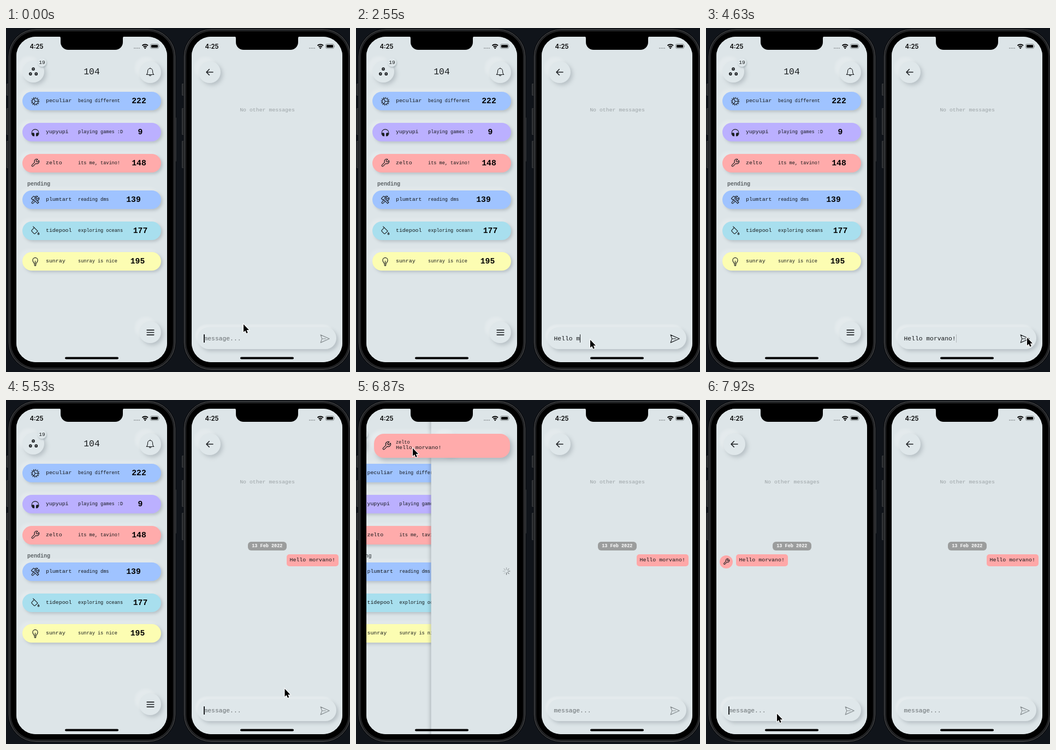
Recreate the animation shown at these times as an HTML page. Size 630x631 px, loop 8 s.

```html
<!DOCTYPE html>
<html lang="en">
<head>
<meta charset="utf-8">
<title>Chat on two phones</title>
<style>
  html, body { margin: 0; width: 100%; height: 100%; overflow: hidden; background: #10141a; }
  #stage { position: absolute; left: 0; top: 0; width: 630px; height: 631px; overflow: hidden; background: #10141a; }
  #stage div, #stage svg { position: absolute; box-sizing: border-box; }
  .phone { top: 0; width: 315px; height: 631px; }
  .body { left: 5px; top: 2px; width: 305px; height: 625px; border-radius: 50px; background: #000;
    border: 1px solid #55575a; box-shadow: inset 0 0 0 2px #1a1b1d, inset 0 0 0 3px #2c2d2f, 0 0 0 1px #08090b; }
  .key { background: #2b2d30; border: 1px solid #3a3c3f; border-radius: 1px; }
  .screen { left: 0; top: 0; width: 315px; height: 631px; background: #dde5e8;
    clip-path: inset(16px 20px 18px 19px round 35.5px); }
  .page { left: 19px; top: 0; width: 276px; height: 631px; background: #dde5e8; }
  .in { left: -19px; top: 0; width: 315px; height: 631px; }
  .t { font-family: "Liberation Mono", "Courier New", monospace; line-height: 20px; margin-top: -10px;
    white-space: pre; color: #15181a; }
  .mid { transform: translateX(-50%); }
  .soft { background: #dfe7ea; box-shadow: -8px -8px 5px rgba(255,255,255,.22), 4px 4px 7px rgba(125,138,145,.38); }
  .round { width: 40px; height: 40px; margin: -20px 0 0 -20px; border-radius: 50%; }
  .row { left: 30px; width: 254px; height: 34px; border-radius: 17px;
    box-shadow: 3px 3px 5px rgba(120,132,140,.35), -5px -5px 6px rgba(255,255,255,.22); }
  .input { left: 30px; top: 549px; width: 254px; height: 40px; border-radius: 20px;
    box-shadow: -4px -5px 3px rgba(255,255,255,.25), 4px 4px 6px rgba(125,138,145,.38); }
  .bubble { top: 283px; width: 95px; height: 22px; border-radius: 5px; background: #ffa8a8; }
  .pill { left: 122px; top: 259.5px; width: 70.5px; height: 16px; border-radius: 6px; background: #9b9d9d; }
  .caret { top: 562px; width: 1.3px; height: 15px; background: #1b1e20; }
  .banner { left: 33px; top: 0; width: 249px; height: 43.5px; border-radius: 18px; background: #ffabab;
    box-shadow: 4px 5px 8px rgba(110,122,130,.42), -6px -6px 6px rgba(255,255,255,.3); }
  .incoming { box-shadow: -2px 0 7px rgba(40,50,60,.32); }
</style>
</head>
<body>
<div id="stage"></div>
<script>
const LOOP = 8000;
const MESSAGE = 'Hello morvano!';
const SENDER = 'zelto';
const KEY_TIMES = [1350, 1500, 1650, 1950, 2100, 2250, 2550, 2700, 2850, 3140, 3290, 3440, 3590, 3890];
const SEND = 5230, DELIVERED = 5530, LOADED = 7320, NO_MORE = 7770, FOCUS = 7920;
const PITCH = 6.8;

const WRENCH = 'M14.7 6.3a1 1 0 0 0 0 1.4l1.6 1.6a1 1 0 0 0 1.4 0l3.8-3.8a6 6 0 0 1-8 8l-6.9 6.9a2.1 2.1 0 0 1-3-3l6.9-6.9a6 6 0 0 1 8-8z';
const path = (d, extra = '') => `<path d="${d}" ${extra}/>`;
const ICONS = {
  gear: '<circle cx="12" cy="12" r="7.800"/>' +
    '<circle cx="12" cy="12" r="9.800" stroke-width="2.400" stroke-linecap="butt" stroke-dasharray="2 3.130"/>' +
    path('M12 12H19.5M12 12L8.200 5.500M12 12L8.200 18.500'),
  headphones: path('M3 17v-4a9 9 0 0 1 18 0v4') +
    path('M3 14q5-3 7 1v7h-3q-4-1-4-8zM21 14q-5-3-7 1v7h3q4-1 4-8z', 'fill="currentColor" stroke="none"'),
  wrench: path(WRENCH),
  tools: path(WRENCH) + path('M2 8l6-6 5 3-2.5 2.5L21 18l-3 3L7.5 10.5l-2.5 1z', 'fill="#9fc3ff"'),
  bucket: path('M9.500 4.500l9 9-7 6.500q-1.500 1-2.500 0l-6-6q-1-1 0-2.500zM9.500 4.500l-3-3M20.500 17.500q3.500 4.500 0 5q-3.500-.5 0-5'),
  bulb: path('M9 17c0-3-3.500-4-3.500-8.500a6.500 6.500 0 0 1 13 0c0 4.500-3.500 5.500-3.500 8.500zM9.500 20h5M10.500 22.500h3M12 10.500V17'),
  bell: path('M18 9A6 6 0 0 0 6 9c0 7-3 9-3 9h18s-3-2-3-9M12 3V1.5M14 18.5a2 2.5 0 0 1-4 0'),
  menu: path('M4 6.500h16M4 12h16M4 17.500h16'),
  back: path('M20 12H4M11 5l-7 7 7 7'),
  dots: [[12, 5.5], [5, 17.5], [19, 17.5]].map(([x, y]) =>
    `<circle cx="${x}" cy="${y}" r="2.500" stroke-width="2.600"/>`).join(''),
  send: path('M1.5 2.5L23 12 1.5 21.5 5 12zM5 12h9')
};

const div = (cls, style = '', body = '', id = '') =>
  `<div class="${cls}" style="${style}"${id && ` id="${id}"`}>${body}</div>`;
const text = (x, y, size, str, style = '', cls = '', id = '') =>
  div('t ' + cls, `left:${x}px;top:${y}px;font-size:${size}px;${style}`, str, id);
const icon = (name, x, y, size, weight = 1.6, id = '') =>
  `<svg ${id && `id="${id}"`} viewBox="0 0 24 24" width="${size}" height="${size}" overflow="visible"
    style="left:${x - size / 2}px;top:${y - size / 2}px;color:#1b1e21" fill="none" stroke="currentColor"
    stroke-width="${weight}" stroke-linecap="round" stroke-linejoin="round">${ICONS[name]}</svg>`;
const button = (name, x, y, size, weight) =>
  div('soft round', `left:${x}px;top:${y}px`) + icon(name, x, y, size, weight);

const row = (y, color, glyph, name, status, count, cx) =>
  div('row', `top:${y}px;background:${color}`) + icon(glyph, 53, y + 17, 17) +
  text(73, y + 17, 9.9, name) + text(132, y + 17, 8.56, status) +
  text(cx, y + 17, 14.7, count, 'font-weight:bold;color:#000', 'mid');

const home = () =>
  button('dots', 50, 80, 18) +
  div('soft', 'left:58px;top:55px;width:16px;height:16px;border-radius:50%;box-shadow:1px 2px 3px rgba(125,138,145,.45)') +
  text(66, 64, 9.5, '19', '', 'mid') + text(157, 81, 16.3, '104', '', 'mid') +
  button('bell', 264, 80.5, 18, 1.5) +
  row(117, '#9fc3ff', 'gear', 'peculiar', 'being different', 222, 243.5) +
  row(174, '#bbb0ff', 'headphones', 'yupyupi', 'playing games :D', 9, 246) +
  row(230.5, '#ffabab', 'wrench', SENDER, 'its me, tavino!', 148, 243.5) +
  text(39, 286.5, 10, 'pending', 'font-weight:bold;color:#5c6265') +
  row(298, '#9fc3ff', 'tools', 'plumtart', 'reading dms', 139, 233.5) +
  row(354.5, '#a8dfee', 'bucket', 'tidepool', 'exploring oceans', 177, 246) +
  row(411, '#fcfdb2', 'bulb', 'sunray', 'sunray is nice', 195, 241) +
  button('menu', 264, 558, 19, 2);

const bubble = x => div('bubble', `left:${x}px`) + text(x + 5.5, 294, 9.93, MESSAGE);

// One chat screen; p prefixes the ids of its moving parts.
const chat = (p, messages) =>
  button('back', 51.5, 80.5, 18, 2.1) +
  text(157.5, 151, 9.9, 'No other messages', 'color:#9ca3a6', 'mid', p + 'none') +
  div('in', 'left:0', div('pill') +
    text(157.3, 267.5, 8.5, '13 Feb 2022', 'color:#fff;font-weight:bold', 'mid') + messages, p + 'msgs') +
  div('in', 'left:0', div('soft input') + text(41.5, 569.5, PITCH / .6, 'message...', '', '', p + 'text') +
    icon('send', 262.5, 569.5, 18, 1.5, p + 'send') + div('caret', '', '', p + 'caret'), p + 'bar');

const spinner = () => `<svg id="spin" style="left:147px;top:304px" width="20" height="20" viewBox="-10 -10 20 20">` +
  Array.from({ length: 8 }, (_, i) =>
    `<path d="M0-3V-6.3" stroke="#777d80" stroke-width="1.3" stroke-linecap="round" transform="rotate(${i * 45})"/>`).join('') + '</svg>';

const statusBar = () => text(56, 33.5, 11.3, '4:25',
    'font-family:Inter,sans-serif;font-weight:600;color:#000', 'mid') +
  `<svg width="315" height="631" style="left:0;top:0">
    <path d="M96 15A4 4 0 0 1 100 19V26A14 14 0 0 0 114 40H200A14 14 0 0 0 214 26V19A4 4 0 0 1 218 15Z"/>
    <path d="M234 37H245" stroke="#a4abae" stroke-width="2" stroke-dasharray="2 1"/>
    <g fill="none" stroke="#000" stroke-width="2"><path d="M249.5 32.3a8 8 0 0 1 10.5 0M251.6 34.8a4.8 4.8 0 0 1 6.3 0"/></g>
    <path d="M254.75 38.5l-2-2.2a3 3 0 0 1 4 0z"/>
    <rect x="264.500" y="29.500" width="15" height="8" rx="2.300" fill="none" stroke="#7d8486"/>
    <rect x="266" y="31" width="12" height="5" rx="1"/><path d="M280.5 32v3q1.5-1.5 0-3" fill="#7d8486"/>
    <rect x="108" y="603.500" width="98" height="4" rx="2"/></svg>`;

const page = (id, cls, body) => div('page ' + cls, '', div('in', '', body), id);
const key = (x, y, h) => div('key', `left:${x}px;top:${y}px;width:5px;height:${h}px`);
const phone = (x, screen) => div('phone', `left:${x}px`,
  key(1, 102, 22) + key(1, 147, 49) + key(1, 207, 50) + key(307, 164, 81) +
  div('body') + div('screen', '', screen + statusBar()));

const banner = div('banner', '', icon('wrench', 23, 21.5, 18) +
  text(40, 15.5, 8.5, SENDER) + text(40, 25.5, 9.93, MESSAGE), 'banner');
const avatar = div('', 'left:25px;top:284.5px;width:24px;height:24px;border-radius:50%;background:#ffa8a8') +
  icon('wrench', 37, 296.5, 13, 1.9);

document.getElementById('stage').innerHTML =
  phone(0, page('home', '', home()) + page('thread', 'incoming', spinner() + chat('l', avatar + bubble(55))) + banner) +
  phone(321, page('other', '', chat('r', bubble(193)))) +
  `<svg id="mouse" width="16" height="24" overflow="visible" style="left:0;top:0">
    <path d="M.5 .5V14.800L3.700 11.900 5.900 17 8.300 16 6.100 11.100H10.500Z" stroke="#fff" stroke-width="2"
      style="paint-order:stroke"/></svg>`;

const $ = id => document.getElementById(id);
const clamp = v => Math.min(1, Math.max(0, v));
const show = (id, on) => { $(id).style.visibility = on ? 'inherit' : 'hidden'; };
const move = (id, x, y) => { $(id).style.transform = `translate(${x}px,${y}px)`; };

// Linear value along [time, value] pairs.
function track(keys, t) {
  const i = keys.findIndex(k => k[0] > t);
  if (i < 0) return keys[keys.length - 1][1];
  if (i === 0) return keys[0][1];
  const [a, va] = keys[i - 1], [b, vb] = keys[i];
  return va + (vb - va) * (t - a) / (b - a);
}

const tick = k => 150 * k - 10 * Math.max(0, Math.floor((k - 8) / 11.4));
function hold(t) {
  let k = Math.floor(t / 150);
  while (tick(k + 1) <= t) k++;
  return tick(k);
}

const mouseX = [[150, 434.5], [900, 428.5], [4190, 428.5], [4630, 587.5], [5400, 587.5],
  [6130, 152.5], [6570, 103.5], [7170, 103.5], [7920, 129.5]];
const mouseY = [[150, 543], [900, 571.5], [4190, 571.5], [4630, 567.5], [5400, 567.5],
  [6130, 353], [6570, 88], [7170, 88], [7470, 270], [7770, 540], [7920, 575]];
const bannerY = [[5680, -70], [5830, 29], [5980, 58], [6130, 63.5], [6280, 62], [6870, 62], [7020, 39], [7170, -70]];
const blink = [[0, 1], [350, 1], [600, 0], [700, 0], [880, 1]];

function bar(p, str, caret, sendAlpha) {
  const label = $(p + 'text');
  label.textContent = str || 'message...';
  label.style.color = str ? '#15181a' : '#666c6f';
  $(p + 'send').style.color = str ? '#1b1e21' : '#858c8f';
  $(p + 'send').style.opacity = sendAlpha;
  $(p + 'caret').style.left = 41.3 + PITCH * str.length + 'px';
  $(p + 'caret').style.opacity = caret;
}

function render(t) {
  const typed = t < SEND ? KEY_TIMES.filter(k => k <= t).length : 0;
  const lastKey = t >= SEND ? SEND : typed ? KEY_TIMES[typed - 1] : -100;
  const caret = t >= NO_MORE ? 0 : track(blink, (t - lastKey) % 1000);
  bar('r', MESSAGE.slice(0, typed), caret, track([[4780, 1], [5080, .4], [5230, 1]], t));
  bar('l', '', t >= FOCUS ? 1 : 0, 1);
  show('rmsgs', t >= DELIVERED);

  const push = .5 - .5 * Math.cos(Math.PI * clamp((t - 6646) / 411));
  move('home', -92 * push, 0);
  move('thread', 276 * (1 - push), 0);
  show('thread', push > 0);
  show('lmsgs', t >= LOADED);
  show('lbar', t >= LOADED);
  show('lnone', t >= NO_MORE);
  show('spin', push > 0 && t < LOADED);
  [...$('spin').children].forEach((spoke, i) => {
    spoke.style.opacity = 1 - ((Math.floor(t / 100) + 8 - i) % 8) * .11;
  });

  const y = track(bannerY, t);
  show('banner', y > -60);
  move('banner', 0, y);
  move('mouse', track(mouseX, t), track(mouseY, t));
}

const start = performance.now();
function loop() {
  render(hold((performance.now() - start) % LOOP));
  requestAnimationFrame(loop);
}
loop();
</script>
</body>
</html>
```
